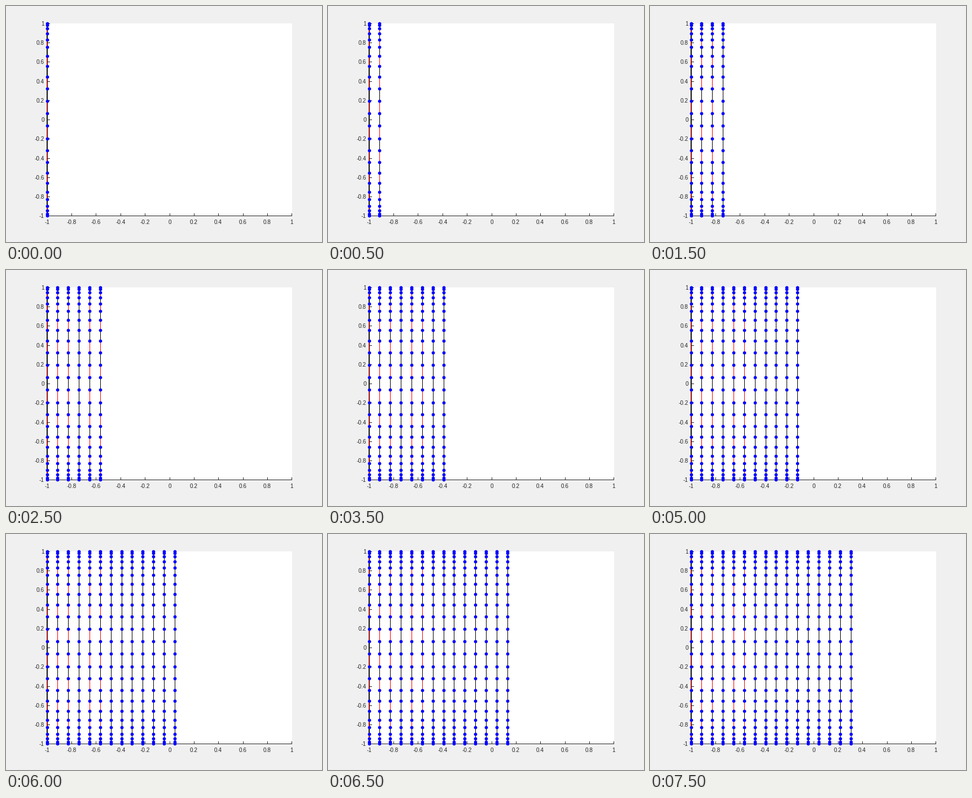
Animation, 560 px wide and 420 px high, one loop 8000 ms. Source, as a matplotlib script:

```python
import numpy as np
import matplotlib.pyplot as plt
from matplotlib.animation import FuncAnimation
from matplotlib.patches import Circle, Rectangle

W, H, DPI = 560, 420, 100
PX = 72 / DPI                      # one pixel in points
LEFT, TOP, WIDTH, HEIGHT = 73, 31.5, 434, 342.3
NODES, FRAMES, STEP_MS = 24, 16, 500
RED_COLUMNS = {0, 1, 2, 4, 5}
INK = "#262626"

plt.rcParams["font.family"] = "Liberation Sans"


def snap(v):
    return np.floor(v) + 0.5


def to_x(v):
    return snap(LEFT + (v + 1) / 2 * WIDTH)


def to_y(v):
    return snap(TOP + (1 - v) / 2 * HEIGHT)


fig = plt.figure(figsize=(W / DPI, H / DPI), dpi=DPI, facecolor="#f0f0f0")
ax = fig.add_axes([0, 0, 1, 1])
ax.set_xlim(0, W)
ax.set_ylim(H, 0)
ax.axis("off")


# Coordinates are already pixel centres, so renderer snapping stays off
def stroke(xs, ys, color, z):
    return ax.plot(xs, ys, color=color, lw=PX, zorder=z, snap=False,
                   solid_capstyle="butt")[0]


def dot(x, y):
    return ax.add_patch(Circle((x, y), 2.9, fc="blue", lw=0, zorder=4,
                               snap=False))


def draw_axes():
    x0, x1, y0, y1 = 73.5, 506.5, 31.5, 373.5
    ax.add_patch(Rectangle((73, 31), 434, 343, fc="white", lw=0, zorder=0,
                           snap=False))
    stroke([x0, x0], [31, 374], INK, 1)
    stroke([73, 507], [y1, y1], INK, 1)
    for i in range(11):
        v = (i - 5) / 5
        x, y = min(to_x(v), x1), max(to_y(v), y0)
        stroke([x, x], [y1, y1 - 4.5], INK, 1)
        stroke([x0, x0 + 4.5], [y, y], INK, 1)
        style = dict(fontsize=10 * PX, color=INK, va="baseline")
        ax.text(x - 0.5, 388, f"{v:g}", ha="center", **style)
        ax.text(68, y + 3.5, f"{v:g}", ha="right", **style)


# Chebyshev nodes down each column, columns evenly spaced
ys = to_y(np.cos(np.pi * (2 * np.arange(NODES) + 1) / (2 * NODES)))
xs = to_x(np.linspace(-1, 1, NODES))


def make_column(k):
    x = xs[k] - (k == 0)           # first line sits beside the axis
    parts = [stroke([x, x], [ys[0], ys[-1]], "black", 2)]
    if k in RED_COLUMNS:
        parts += [stroke([x, x], [a, b], "red", 3)
                  for a, b in zip(ys[::2], ys[1::2])]
    return parts + [dot(xs[k], y) for y in ys]


draw_axes()
columns = [make_column(k) for k in range(FRAMES)]


def update(n):
    for k, parts in enumerate(columns):
        for p in parts:
            p.set_visible(k <= n)
    return [p for parts in columns for p in parts]


anim = FuncAnimation(fig, update, frames=FRAMES, interval=STEP_MS,
                     init_func=lambda: update(0), repeat=True,
                     repeat_delay=0, blit=False)
plt.show()
```
